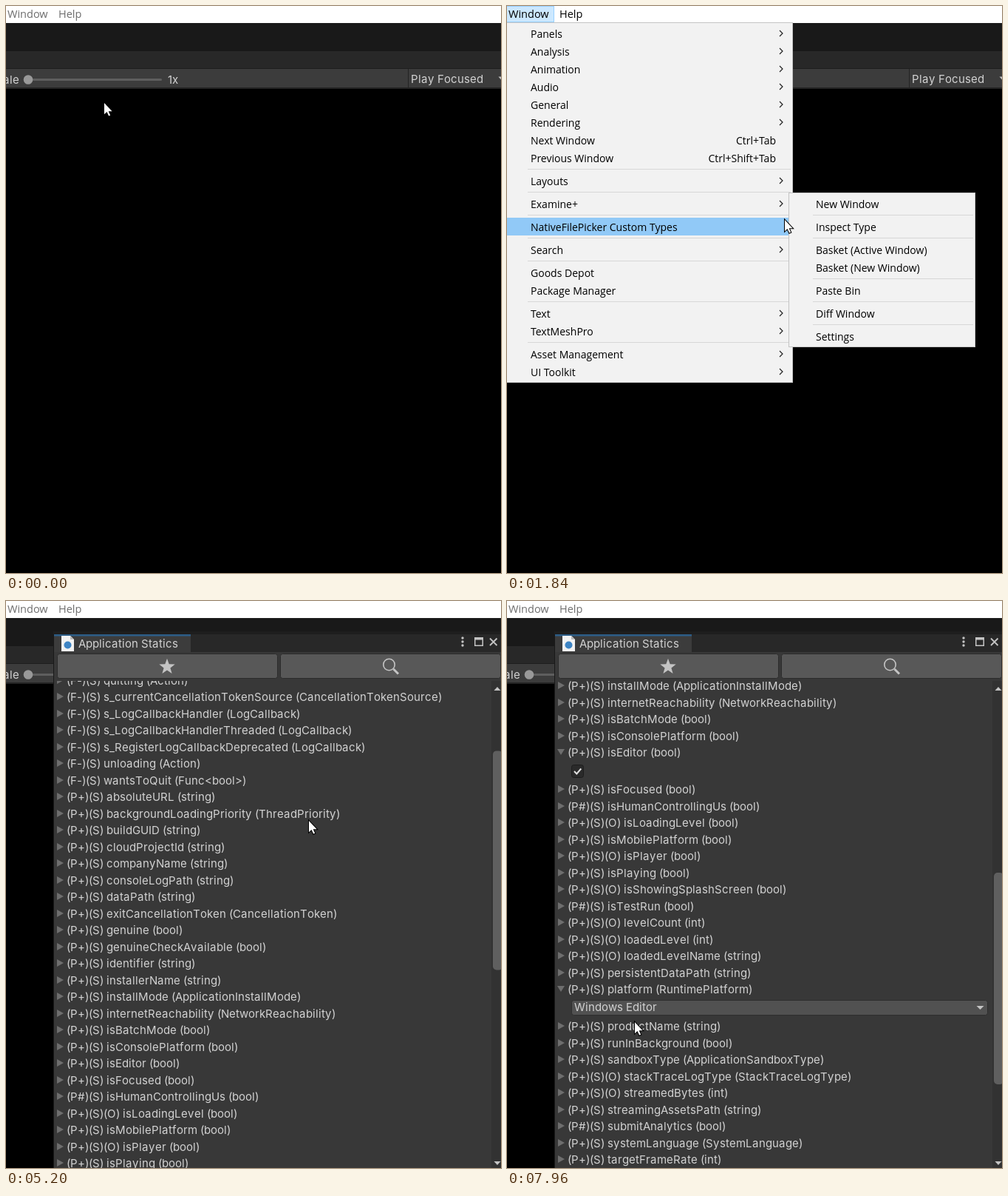
Write an HTML page that moves like this. It is 670 px wide and 766 px high and loops after 8 s.

```html
<!DOCTYPE html>
<html lang="en">
<head>
<meta charset="utf-8">
<title>Type inspector demo</title>
<style>
  html, body { margin: 0; width: 100%; height: 100%; overflow: hidden; background: #000; }
  svg { display: block; width: 670px; height: 766px; }
  text { white-space: pre; }
  .ui { font: 15px Inter, Roboto, sans-serif; fill: #d2d2d2; }
  .os { font: 14px "Open Sans", "Noto Sans", sans-serif; fill: #000; }
  .bar { font-size: 14.5px; }
</style>
</head>
<body>
<svg id="stage" viewBox="0 0 670 766" xmlns="http://www.w3.org/2000/svg">
  <defs><clipPath id="view"><rect x="65" y="108" width="592" height="658"/></clipPath></defs>
</svg>
<script>
const NS = 'http://www.w3.org/2000/svg';
const stage = document.getElementById('stage');

function el(parent, tag, attrs = {}, content) {
  const e = document.createElementNS(NS, tag);
  for (const k in attrs) e.setAttribute(k, attrs[k]);
  if (content !== undefined) e.textContent = content;
  parent.appendChild(e);
  return e;
}
const group = (p, attrs) => el(p, 'g', attrs);
const rect = (p, x, y, width, height, fill, more) => el(p, 'rect', { x, y, width, height, fill, ...more });
const path = (p, d, fill, more) => el(p, 'path', { d, fill, ...more });
const line = (p, d, stroke, w = 1) => path(p, d, 'none', { stroke, 'stroke-width': w });
const label = (p, x, y, str, cls = 'os', more) => el(p, 'text', { x, y, class: cls, ...more }, str);
const show = (e, on) => e.setAttribute('visibility', on ? 'visible' : 'hidden');
const fade = (e, a) => { show(e, a > 0); e.setAttribute('opacity', a); };
const move = (e, x, y) => e.setAttribute('transform', `translate(${x} ${y})`);
const ramp = (t, a, b) => Math.min(1, Math.max(0, (t - a) / (b - a)));

// Editor text sits on whole-pixel advances; wide letters round up a little sooner
const pen = document.createElement('canvas').getContext('2d');
pen.font = '15px Inter, Roboto, sans-serif';
pen.textRendering = 'geometricPrecision';
function advance(ch) {
  const w = pen.measureText(ch).width;
  return Math.floor(w + (w > 7 ? .6 : .5));
}
const widthOf = str => [...str].reduce((w, ch) => w + advance(ch), 0);

function setText(e, x, str) {
  const xs = [];
  for (const ch of str) {
    xs.push(x);
    x += advance(ch);
  }
  e.setAttribute('x', xs.join(' '));
  e.textContent = str;
}
// align: 0 starts at x, .5 centres on x, 1 ends at x
function uiText(p, x, y, str, align = 0) {
  const e = el(p, 'text', { y, class: 'ui' });
  setText(e, Math.round(x - widthOf(str) * align), str);
  return e;
}

// Editor background
rect(stage, 0, 0, 670, 23, '#fff');
rect(stage, 0, 23, 670, 38, '#191919');
rect(stage, 0, 61, 670, 24, '#282828');
rect(stage, 0, 84, 670, 1, '#1e1e1e');
rect(stage, 0, 85, 670, 25, '#3c3c3c');
rect(stage, 0, 110, 670, 2, '#232323');
uiText(stage, 18, 105, 'Scale', 1);
rect(stage, 30, 98, 181, 3, '#5e5e5e', { rx: 1.5 });
el(stage, 'circle', { cx: 30, cy: 99.5, r: 6.3, fill: '#999' });
uiText(stage, 219, 105, '1x');
rect(stage, 544, 85, 1, 25, '#232323');
uiText(stage, 548, 104, 'Play Focused');
path(stage, 'M666.5 95.5h8l-4 4.5z', '#c4c4c4');

// Menu bar
const barHot = group(stage);
rect(barHot, -.5, .5, 64, 21, '#cce8ff', { stroke: '#99d1ff' });
const barText = [label(stage, 2, 16, 'Window', 'os bar'), label(stage, 71, 16, 'Help', 'os bar')];

// Type name dialog
const dialog = group(stage);
rect(dialog, 230, 213, 358, 131, '#3c3c3c');
rect(dialog, 230, 213, 358, 37, '#fff');
rect(dialog, 562, 221, 25, 25, '#c75050');
line(dialog, 'M571.5 230.5l6 6m0-6l-6 6', '#fff', 1.6);
uiText(dialog, 236, 270, 'Enter Type name:');
rect(dialog, 234.5, 278.5, 349, 22, '#2a2a2a', { rx: 3, stroke: '#3a79bb' });
const typed = uiText(dialog, 237, 295, '');
const caret = rect(dialog, 0, 281, 1, 17, '#d2d2d2');
rect(dialog, 234.5, 304.5, 349, 23, '#585858', { rx: 3, stroke: '#303030' });
uiText(dialog, 407, 321, 'OK', .5);

// Inspector window
const win = group(stage);
rect(win, 64, 41, 606, 4, '#1e1e1e');
rect(win, 64, 45, 606, 721, '#191919');
rect(win, 65, 45, 605, 24, '#282828');
rect(win, 65, 45, 185, 25, '#3c3c3c');
rect(win, 65, 45, 185, 2.5, '#2c5d87');
rect(win, 65, 69, 605, 697, '#383838');
path(win, 'M75 47h12l5 5v16h-17z', '#f2f2f2');
path(win, 'M87 47v5h5z', '#bbb');
el(win, 'circle', { cx: 83.5, cy: 59.5, r: 5, fill: '#3d84c4' });
uiText(win, 98, 63, 'Application Statics');
for (const cy of [50, 55, 60]) el(win, 'circle', { cx: 618, cy, r: 1.7, fill: '#c4c4c4' });
path(win, 'M634 49h12v12h-12zM635.5 52.5v7h9v-7z', '#c4c4c4', { 'fill-rule': 'evenodd' });
line(win, 'M655 50.5l9.5 9.5m0-9.5l-9.5 9.5', '#c4c4c4', 1.8);
for (const x of [69.5, 371.5]) rect(win, x, 71.5, 298, 33, '#585858', { rx: 3, stroke: '#2c2c2c' });
const star = Array.from({ length: 10 }, (_, i) => {
  const r = i % 2 ? 4.6 : 11.3, a = i * Math.PI / 5;
  return (218 + r * Math.sin(a)).toFixed(1) + ' ' + (89 - r * Math.cos(a)).toFixed(1);
});
path(win, 'M' + star.join('L') + 'z', '#c4c4c4');
el(win, 'circle', { cx: 518.5, cy: 86, r: 7.7, fill: 'none', stroke: '#c4c4c4', 'stroke-width': 1.6 });
line(win, 'M524.5 92l6.5 6.5', '#c4c4c4', 3);

// Member list: each entry is kind, access, flags, then the member
const members = `F- deepLinkActivated (Action<string>)
F- focusChanged (Action<bool>)
F- lowMemory (LowMemoryCallback)
F- memoryUsageChanged (MemoryUsageChangedCallback)
F# OnAdvertisingIdentifierCallback (AdvertisingIdentifierCallback)
F- quitting (Action)
F- s_currentCancellationTokenSource (CancellationTokenSource)
F- s_LogCallbackHandler (LogCallback)
F- s_LogCallbackHandlerThreaded (LogCallback)
F- s_RegisterLogCallbackDeprecated (LogCallback)
F- unloading (Action)
F- wantsToQuit (Func<bool>)
P+ absoluteURL (string)
P+ backgroundLoadingPriority (ThreadPriority)
P+ buildGUID (string)
P+ cloudProjectId (string)
P+ companyName (string)
P+ consoleLogPath (string)
P+ dataPath (string)
P+ exitCancellationToken (CancellationToken)
P+ genuine (bool)
P+ genuineCheckAvailable (bool)
P+ identifier (string)
P+ installerName (string)
P+ installMode (ApplicationInstallMode)
P+ internetReachability (NetworkReachability)
P+ isBatchMode (bool)
P+ isConsolePlatform (bool)
P+ isEditor (bool)
P+ isFocused (bool)
P# isHumanControllingUs (bool)
P+O isLoadingLevel (bool)
P+ isMobilePlatform (bool)
P+O isPlayer (bool)
P+ isPlaying (bool)
P+O isShowingSplashScreen (bool)
P# isTestRun (bool)
P+O levelCount (int)
P+O loadedLevel (int)
P+O loadedLevelName (string)
P+ persistentDataPath (string)
P+ platform (RuntimePlatform)
P+ productName (string)
P+ runInBackground (bool)
P+ sandboxType (ApplicationSandboxType)
P+O stackTraceLogType (StackTraceLogType)
P+O streamedBytes (int)
P+ streamingAssetsPath (string)
P# submitAnalytics (bool)
P+ systemLanguage (SystemLanguage)
P+ targetFrameRate (int)
P+ temporaryCachePath (string)
P+ unityVersion (string)
P+ unityVersionMaj (int)`.split('\n');

const list = group(group(win, { 'clip-path': 'url(#view)' }));
rect(list, 70, 113, 582, 45, '#323232', { rx: 3 });
['(F)ield, (P)roperty, (M)ethod, (S)tatic, (O)bsolete', '(+)Public, (#)Protected/Internal, (-)Private']
  .forEach((s, i) => uiText(list, 360.5, 132 + 18 * i, s, .5));

const rows = members.map(m => {
  const [code, ...rest] = m.split(' ');
  const g = group(list);
  const shut = path(g, 'M69 -5.5l9 5l-9 5z', '#6e6e6e');
  const open = path(g, 'M68 -4.5h10l-5 8z', '#6e6e6e');
  uiText(g, 82, 5.5, `(${code.slice(0, 2)})(S)${code[2] ? '(O)' : ''} ${rest.join(' ')}`);
  return { g, shut, open, name: rest[0] };
});

function detail(name, at, draw) {
  const row = rows.find(r => r.name === name);
  row.at = at;
  row.body = group(row.g);
  draw(row.body);
}
detail('isEditor', 6400, g => {
  rect(g, 87.5, 17, 16, 17, '#2a2a2a', { rx: 3, stroke: '#1c1c1c' });
  line(g, 'M91 25.5l3.3 3.5l6-7', '#e0e0e0', 2);
});
detail('platform', 7760, g => {
  rect(g, 87.5, 15, 563, 20, '#515151', { rx: 3, stroke: '#2e2e2e' });
  uiText(g, 91, 29.5, 'Windows Editor');
  path(g, 'M635.5 22.5h10l-5 5z', '#c4c4c4');
});

rect(win, 657, 108, 13, 658, '#323232');
path(win, 'M660.5 121h9l-4.5-5z', '#c4c4c4');
path(win, 'M660.5 757h9l-4.5 5z', '#c4c4c4');
const thumb = rect(win, 659, 128, 13, 296, '#5f5f5f', { rx: 5 });

// Drop-down menus: '>' opens a submenu, '|' precedes a shortcut, '' is a separator
function menu(left, right, top, bottom, items) {
  const g = group(stage);
  rect(g, left + .5, top + .5, right - left - 1, bottom - top - 1, '#f2f2f2', { stroke: '#c4c4c4' });
  const hot = rect(g, left + 3, 0, right - left - 6, 24, '#91c9f7');
  const ys = [];
  let y = top + 16;
  for (const item of items) {
    if (!item) {
      rect(g, left + 33, y - 10, right - left - 36, 1, '#d7d7d7');
      y += 7;
      continue;
    }
    const [name, key] = item.replace('>', '').split('|');
    label(g, left + 37, y + 5, name);
    if (key) label(g, right - 23, y + 5, key, 'os', { 'text-anchor': 'end' });
    if (item.endsWith('>')) line(g, `M${right - 18} ${y - 5}l4 4l-4 4`, '#222', 1.2);
    ys.push(y);
    y += 24;
  }
  const rowAt = (px, py) => px < left || px > right ? undefined : ys.find(v => py >= v - 13 && py < v + 11);
  const light = v => {
    show(hot, v !== undefined && g.getAttribute('visibility') !== 'hidden');
    if (v) hot.setAttribute('y', v - 13);
  };
  return { g, rowAt, light };
}
const main = menu(-5, 387, 22, 509, ['Panels>', 'Analysis>', 'Animation>', 'Audio>', 'General>', 'Rendering>',
  'Next Window|Ctrl+Tab', 'Previous Window|Ctrl+Shift+Tab', '', 'Layouts>', '', 'Examine+>', '',
  'NativeFilePicker Custom Types', '', 'Search>', '', 'Goods Depot', 'Package Manager', '',
  'Text>', 'TextMeshPro>', '', 'Asset Management>', 'UI Toolkit>']);
const sub = menu(381, 634, 252, 461, ['New Window', '', 'Inspect Type', '', 'Basket (Active Window)',
  'Basket (New Window)', '', 'Paste Bin', '', 'Diff Window', '', 'Settings']);
const SUB_OWNER = 268;

// Pointers
const arrow = path(stage, 'M0 0v15.2l3.5-3.2 2.6 5.6 2.1-.9-2.5-5.5h4.9z', '#fff',
  { stroke: '#000', 'stroke-width': 2, 'paint-order': 'stroke' });
const beam = line(stage, 'M408 290.5h2.5l1 1 1-1h2.5M411.5 291v14M408 305.5h2.5l1-1 1 1h2.5', '#c8c8c8');

// Timelines
const pointer = [[0, 133, 131], [200, 35, 4], [320, 35, 4], [360, 32, 10], [720, 32, 10], [1280, 130, 262],
  [1520, 130, 262], [1840, 376, 289], [1880, 376, 289], [2200, 410, 297], [5520, 410, 297], [6160, 79, 184],
  [6280, 79, 184], [6320, 87, 199], [6800, 87, 199], [7600, 187, 525], [7680, 187, 525], [7960, 173, 569]];
const keys = [2880, 3200, 3320, 3400, 3480, 3560, 3720, 3840, 3920, 4000, 4120];
const wheel = [[5160, 60], [5200, 180], [5240, 300], [5280, 420], [5360, 540], [5520, 600]];

function pointerAt(t) {
  const i = pointer.findIndex(p => p[0] > t);
  if (i < 0) return pointer[pointer.length - 1].slice(1);
  const a = pointer[i - 1], b = pointer[i], u = ramp(t, a[0], b[0]), e = u * u * (3 - 2 * u);
  return [a[1] + (b[1] - a[1]) * e, a[2] + (b[2] - a[2]) * e].map(Math.round);
}

function drawMenus(t, x, y) {
  const gone = 1 - ramp(t, 2280, 2400);
  fade(main.g, ramp(t, 480, 640) * gone);
  fade(sub.g, ramp(t, 1360, 1520) * gone);
  const active = t >= 520 && t < 2400;
  show(barHot, active);
  for (const b of barText) b.style.fill = active ? '#000' : '#6d6d6d';
  const inSub = t >= 1400 ? sub.rowAt(x, y) : undefined;
  sub.light(inSub);
  main.light(inSub ? SUB_OWNER : main.rowAt(x, y));
}

function drawDialog(t) {
  fade(dialog, t < 4360 ? ramp(t, 2440, 2600) : 0);
  const str = 'application'.slice(0, keys.filter(k => k <= t).length);
  setText(typed, 237, str);
  caret.setAttribute('x', 237 + widthOf(str));
}

function drawWindow(t) {
  show(win, t >= 4360);
  const scroll = wheel.reduce((s, [at, to]) => t >= at ? to : s, 0);
  move(list, 0, -scroll);
  let opened = 0;
  rows.forEach((r, i) => {
    const open = t >= r.at;
    move(r.g, 0, 174.5 + Math.round(22.5 * i + 27.5 * opened));
    r.open.setAttribute('display', open ? 'inline' : 'none');
    r.shut.setAttribute('display', open ? 'none' : 'inline');
    if (r.body) r.body.setAttribute('display', open ? 'inline' : 'none');
    if (open) opened++;
  });
  thumb.setAttribute('y', 128 + scroll * 248 / 600 - 4.5 * opened);
  thumb.setAttribute('height', 296 - 5 * opened);
}

function draw(t) {
  const [x, y] = pointerAt(t);
  const typing = t >= 2600 && t < 4360;
  drawMenus(t, x, y);
  drawDialog(t);
  drawWindow(t);
  move(arrow, x, y);
  show(arrow, !typing);
  show(beam, typing);
}

const start = performance.now();
function tick() {
  const t = (performance.now() - start) % 8000;
  draw(Math.floor(t / 40) * 40);
  requestAnimationFrame(tick);
}
tick();
</script>
</body>
</html>
```
